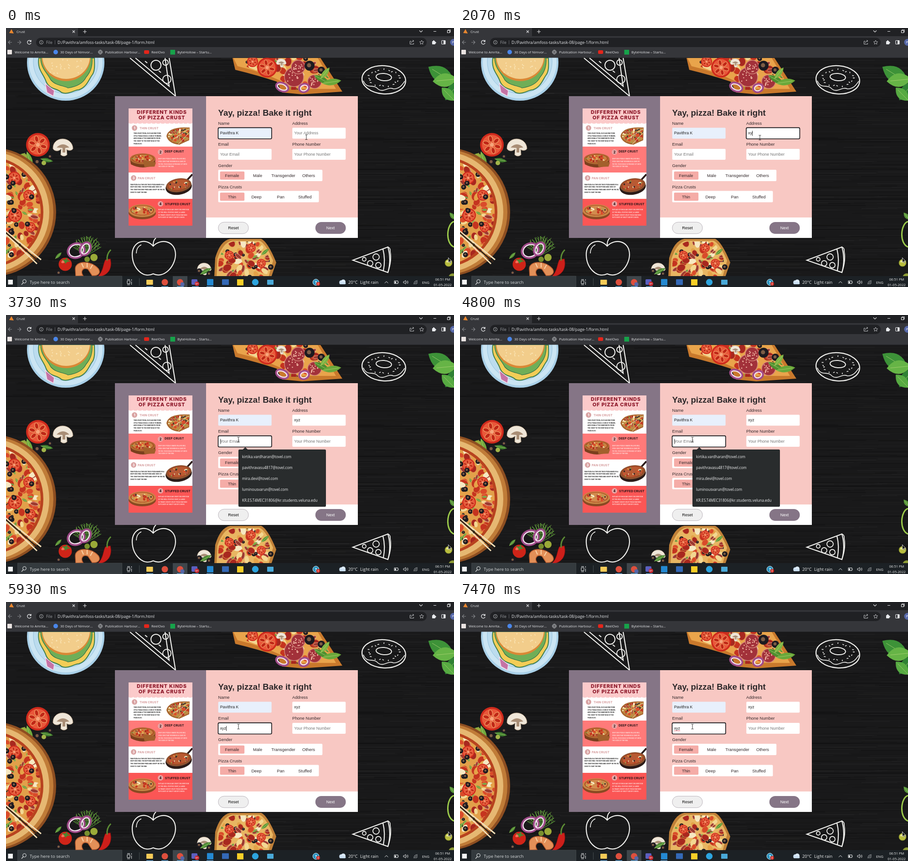
Recreate the animation shown at these times as an HTML page with a canvas. Size 983 by 570 pixels, loop 8000 ms.

```html
<!DOCTYPE html>
<html lang="en">
<head>
<meta charset="utf-8">
<title>Crust</title>
<style>
html, body { margin: 0; width: 100%; height: 100%; overflow: hidden; background: #1b1c1d; }
canvas { display: block; width: 983px; height: 570px; }
</style>
</head>
<body>
<canvas id="stage" width="983" height="570"></canvas>
<script>
const W = 983, H = 570, LOOP = 8000, TAU = Math.PI * 2;
const ARIAL = '"Liberation Sans", Arial, sans-serif';
const UI = '"Open Sans", "Noto Sans", sans-serif';
const POSTER = 'Inter, sans-serif';
const PURPLE = '#857586', PINK = '#f8c8c3';
const screen = document.getElementById('stage').getContext('2d');
const scene = document.createElement('canvas');
scene.width = W; scene.height = H;
let c = scene.getContext('2d');

let seed = 11;
const rnd = () => (seed = seed * 16807 % 2147483647) / 2147483647;
const pick = list => list[Math.floor(rnd() * list.length)];

function paint(shape, fill, stroke, w = 1) {
  if (fill) { c.fillStyle = fill; c.fill(shape); }
  if (stroke) { c.strokeStyle = stroke; c.lineWidth = w; c.stroke(shape); }
}
const path = (d, fill, stroke, w) => paint(new Path2D(d), fill, stroke, w);
function oval(x, y, rx, ry, fill, stroke, w, rot = 0) {
  const p = new Path2D();
  p.ellipse(x, y, rx, ry, rot, 0, TAU);
  paint(p, fill, stroke, w);
}
const dot = (x, y, r, fill, stroke, w) => oval(x, y, r, r, fill, stroke, w);
function box(x, y, w, h, fill, r = 0, stroke, lw) {
  const p = new Path2D();
  p.roundRect(x, y, w, h, r);
  paint(p, fill, stroke, lw);
}
function text(s, x, y, font, color, align = 'left', gap = 0) {
  c.font = font;
  c.fillStyle = color;
  c.textAlign = align;
  c.textBaseline = 'alphabetic';
  c.letterSpacing = gap + 'px';
  c.fillText(s, x, y);
  c.letterSpacing = '0px';
}
function leaf(x, y, len, wid, ang, col) {
  c.save();
  c.translate(x, y);
  c.rotate(ang);
  path(`M0 0Q${len / 2} ${-wid} ${len} 0Q${len / 2} ${wid} 0 0Z`, col);
  path(`M0 0L${len * .85} 0`, null, '#b5d67a', .7);
  c.restore();
}
function tomato(x, y, r) {
  dot(x, y, r, '#cf2a1c');
  dot(x, y, r * .84, '#e9573a');
  for (let i = 0; i < 6; i++) {
    const a = i * TAU / 6 + .3;
    oval(x + Math.cos(a) * r * .5, y + Math.sin(a) * r * .5, r * .27, r * .16, '#c02717', '#f0a066', r * .05, a);
  }
  dot(x, y, r * .17, '#f5a57a');
}
function olive(x, y, r) {
  dot(x, y, r, '#1c1a20');
  dot(x - r * .1, y - r * .1, r * .42, '#7c5c45');
}
function mushroom(x, y, k) {
  c.save();
  c.translate(x, y);
  c.scale(k, k);
  path('M-22 4C-22-24 20-24 22 4C20 10 10 9 8 6L9 18Q2 24-5 18L-4 5C-10 12-20 10-22 4Z', '#efe6d8', '#b39d84', 1);
  path('M-14 2Q0-12 14 2L5 3 5 13-1 13-1 3Z', '#a98e76');
  c.restore();
}
function onion(x, y, rx, ry, rot) {
  oval(x, y, rx, ry, null, '#a04a89', 4, rot);
  oval(x, y, rx - 3, ry - 3, null, '#f2dcec', 2.5, rot);
}
function toppings(x, y, rx, ry, n, size) {
  for (let i = 0; i < n; i++) {
    const a = rnd() * TAU, d = Math.sqrt(rnd());
    const px = x + Math.cos(a) * rx * d, py = y + Math.sin(a) * ry * d, r = size * (.5 + rnd() * .6);
    const kind = rnd();
    if (kind < .32) oval(px, py, r, r * .8, pick(['#c5341f', '#d94b2a', '#a8281f']), '#e38f4c', r * .12, a);
    else if (kind < .58) oval(px, py, r, r * .6, pick(['#f3d791', '#f6e8c2', '#e5a248']), null, 0, a);
    else if (kind < .76) leaf(px, py, r * 1.6, r * .6, a, pick(['#4f8a2e', '#6b9c3a']));
    else if (kind < .88) olive(px, py, r * .5);
    else oval(px, py, r * .9, r * .4, '#9c3a30', '#e0a08a', r * .12, a);
  }
}
function pizza(x, y, rx, ry, rot, crust, cheese) {
  c.save();
  c.translate(x, y);
  c.rotate(rot);
  oval(0, 0, rx, ry, crust);
  oval(0, -ry * .06, rx * .86, ry * .8, '#a9441f');
  oval(0, -ry * .06, rx * .8, ry * .72, cheese);
  toppings(0, -ry * .06, rx * .72, ry * .6, 26, 3.2);
  c.restore();
}
const chalk = (d, w = 2.2) => path(d, null, '#f1f1ee', w);

function wood() {
  box(0, 65, W, 482, '#19191a');
  for (let i = 0; i < 1100; i++) {
    const x = rnd() * W - 60, y = 65 + rnd() * 482;
    c.fillStyle = rnd() < .5 ? `rgba(255,255,255,${rnd() * .04})` : `rgba(0,0,0,${rnd() * .28})`;
    c.fillRect(x, y, 40 + rnd() * 190, .6 + rnd() * 1.2);
  }
  for (let y = 112; y < 546; y += 66) box(0, y, W, 1.6, 'rgba(0,0,0,.35)');
}

function burger() {
  oval(131, 76, 85, 84, '#a9d0e8');
  oval(131, 75, 81, 80, '#cbe5f3');
  oval(131, 74, 71, 70, '#bcdcee', '#94c1dd', 1);
  path('M72 66C68 92 82 100 88 118C96 136 112 132 122 142C136 148 150 136 160 136C178 130 182 112 190 102C196 92 194 78 194 66Z', '#f3cd57', '#3d7d4b', 2);
  path('M76 66C76 88 90 98 98 114C110 128 126 126 136 132C150 130 168 124 176 108C186 96 190 84 189 66Z', '#6fae57', '#2f6f4a', 1.2);
  path('M86 122L106 138 104 150 90 142Z', '#c573a5', '#f2dbe9', 1.5);
  path('M78 66C80 96 104 117 132 117C160 117 184 96 186 66Z', '#d98836');
  path('M80 66C82 93 106 112 132 112C160 112 182 92 184 66Z', '#f2cd8b');
  for (let i = 0; i < 26; i++) oval(96 + rnd() * 70, 68 + rnd() * 32, 1.6, .9, '#fbe6b8', null, 0, rnd() * 3);
}

function chalkTop() {
  chalk('M272 66L372 150L358 66M284 66L358 128L349 66');
  for (const [x, y, r] of [[329, 82, 11], [353, 113, 9], [350, 76, 6]]) dot(x, y, r, null, '#f1f1ee', 2);
  chalk('M305 73l5 4M340 98l-5-4');
  oval(829, 114, 48, 31, null, '#f1f1ee', 2.2, .08);
  oval(829, 108, 17, 8, null, '#f1f1ee', 2, .08);
  chalk('M784 116C792 136 806 122 816 134C828 144 838 128 850 134C864 134 870 124 875 117', 1.6);
  for (let i = 0; i < 20; i++) {
    const a = i * TAU / 20, x = 829 + Math.cos(a) * 33, y = 110 + Math.sin(a) * 18;
    chalk(`M${x} ${y}l${Math.cos(i * 2) * 4} ${Math.sin(i * 2) * 3}`, 1.6);
  }
}

function topSlice() {
  path('M497 66L503 92Q552 104 594 118L606 142 650 146 738 140 690 66Z', '#c9792c');
  path('M499 66L508 84Q560 96 602 116L630 134 724 134 684 66Z', '#e9a44b');
  c.save();
  c.clip(new Path2D('M518 66L524 84 600 112 626 136 722 134 682 66Z'));
  toppings(612, 96, 104, 42, 64, 11);
  c.restore();
  tomato(573, 87, 22);
  tomato(541, 74, 12);
  for (const [x, y, r] of [[632, 108, 21], [641, 86, 15], [677, 118, 15]]) {
    dot(x, y, r, '#a2313a', '#d38478', 1.5);
    for (let i = 0; i < 18; i++) dot(x + (rnd() - .5) * r * 1.4, y + (rnd() - .5) * r * 1.4, 1.3, '#efb3a0');
  }
  onion(606, 130, 14, 9, .4);
  onion(654, 132, 11, 9, -.3);
  olive(666, 83, 11);
  olive(692, 93, 8);
  mushroom(604, 76, .5);
  leaf(676, 104, 40, 13, .5, '#4f8f2f');
  leaf(694, 122, 42, 14, -.15, '#6aa83a');
  leaf(690, 112, 32, 11, -.9, '#7fb444');
}

function sides() {
  leaf(983, 120, 66, 34, Math.PI + .55, '#3d9238');
  leaf(990, 112, 54, 30, Math.PI - .1, '#66b446');
  leaf(996, 118, 52, 25, Math.PI - .9, '#2f8134');
  leaf(984, 160, 40, 22, Math.PI + .8, '#57aa42');
  leaf(986, 422, 20, 9, Math.PI + .9, '#57953a');
  path('M983 426C967 430 963 474 983 482', null, '#9dcc4b', 3);
  dot(971, 517, 8, '#b9bd3f', '#6d7824', 1);
  dot(968, 514, 2, '#e7e69a');
  dot(980, 549, 9, '#8d9b35');

  leaf(42, 275, 30, 9, 2.5, '#5b9433');
  leaf(46, 272, 40, 13, 1.3, '#72a93d');
  leaf(76, 288, 28, 9, .2, '#3f7d2d');
  tomato(70, 257, 26);
  mushroom(125, 261, 1);
  olive(69, 295, 8);
  olive(97, 283, 6);
  dot(39, 283, 7, '#9aab3d');
  dot(83, 297, 5, '#a2b449');
}

function bigPizza() {
  dot(-32, 405, 142, '#8d4e21');
  dot(-34, 405, 138, '#c07c38');
  dot(-38, 405, 133, '#e6b872');
  dot(-40, 405, 122, '#b8431f');
  dot(-40, 405, 116, '#e2a04a');
  c.save();
  c.beginPath();
  c.arc(-40, 405, 116, 0, TAU);
  c.clip();
  toppings(32, 400, 46, 120, 140, 10);
  for (const [x, y, r] of [[18, 330, 14], [50, 368, 12], [20, 412, 15], [54, 438, 11]]) tomato(x, y, r);
  for (let i = 0; i < 12; i++) olive(rnd() * 70, 310 + rnd() * 190, 5.5);
  c.restore();
  path('M-2 446L77 510M-2 452L68 519', null, '#f2ddb6', 3);
  path('M-2 449L73 515', null, '#382618', 3);
}

function bottomFood() {
  for (let i = 0; i < 13; i++) {
    const a = -2.9 + i * .22, x = 178 + Math.cos(a) * 32, y = 490 + Math.sin(a) * 32;
    path(`M178 500Q${(178 + x) / 2} ${y + 10} ${x} ${y}`, null, '#4f8f34', 1.2);
    for (let k = 0; k < 6; k++) path(`M${178 + (x - 178) * (.4 + k * .1)} ${496 + (y - 496) * (.4 + k * .1)}l${rnd() * 12 - 6} ${-rnd() * 8}`, null, '#76b343', .9);
  }
  onion(154, 490, 19, 16, -.4);
  onion(174, 486, 11, 15, .5);
  dot(130, 520, 14.5, '#cf2418');
  oval(126, 514, 5, 3, '#f4735a', null, 0, -.5);
  path('M122 508l7 2 5-5 1 6 7 2-8 2-4 4-2-5Z', '#4d8530');
  path('M152 530C152 512 186 510 203 530C209 540 201 546 189 545L180 531C168 526 163 536 169 545L153 546Z', '#e39058', '#b85a2c', 1.5);
  path('M166 518l4 9M178 517l0 10M190 521l-5 9', null, '#fbd2a6', 2);
  path('M229 508C234 530 224 546 200 548C214 536 212 522 218 510Z', '#cd1f1a', '#7d100f', 1);
  path('M222 512Q220 498 230 488', null, '#5c8c34', 3);
  dot(193, 505, 8, '#9aaa38');
  dot(178, 509, 6, '#78902e');
  olive(116, 539, 6);
  leaf(108, 508, 20, 7, -.8, '#548f34');

  chalk('M323 480C306 460 276 470 277 500C278 528 300 552 323 541C346 552 371 526 372 499C372 468 340 462 323 480ZM323 480Q322 468 329 462');
  chalk('M286 496Q286 482 297 477', 1.6);
  chalk('M761 511L838 482Q846 510 838 538ZM827 486Q833 510 828 534');
  chalk('M838 482q6 2 5 10q4 20-5 46', 1.8);
  for (const [x, y, r] of [[812, 504, 7], [799, 518, 6], [817, 522, 6], [786, 509, 4]]) dot(x, y, r, null, '#f1f1ee', 1.8);

  mushroom(435, 529, .7);
  leaf(426, 542, 28, 9, -.5, '#4c8a35');
  olive(424, 535, 6);
  olive(446, 541, 6);
  path('M457 548L459 506Q470 468 492 464L560 464Q574 470 593 516L582 548Z', '#c08038');
  path('M462 548L464 508Q476 472 496 468L556 468Q570 474 586 512L576 548Z', '#e8b662');
  c.save();
  c.clip(new Path2D('M464 548L467 508Q480 474 498 470L554 470Q566 478 580 512L572 548Z'));
  toppings(525, 512, 60, 46, 95, 9);
  for (const [x, y] of [[490, 500], [538, 484], [560, 518]]) tomato(x, y, 10);
  c.restore();
  leaf(560, 500, 22, 7, -.7, '#5f9a38');
  olive(581, 526, 6);
}

function poster() {
  box(269, 177, 140, 258, '#fff');
  box(269, 177, 140, 31, '#fbcaca');
  for (let x = 274; x < 409; x += 10) oval(x, 208, 5, 2.6, '#fbcaca');
  box(269, 261, 140, 57, '#ff7a79');
  box(269, 376, 140, 59, '#fb5655');
  const title = '800 11px ' + POSTER;
  text('DIFFERENT KINDS', 342, 188.5, title, '#8b1527', 'center', .8);
  text('OF PIZZA CRUST', 342, 201, title, '#8b1527', 'center', .8);

  const badge = (n, x, y, fill, ink, label, lx, ly, col) => {
    dot(x, y, 6, fill);
    text(n, x, y + 2.5, '800 7px ' + POSTER, ink, 'center');
    text(label, lx, ly, '700 6.6px ' + POSTER, col, 'left', .12);
  };
  badge('1', 282, 220, '#d9a3a3', '#fff', 'THIN CRUST', 293, 222.5, '#d59a9b');
  badge('2', 339, 273, '#e9a5a5', '#2a1518', 'DEEP CRUST', 348, 273.6, '#201316');
  badge('3', 280, 330, '#d9a3a3', '#fff', 'PAN CRUST', 289, 332.5, '#d59a9b');
  badge('4', 339, 387, '#e9a5a5', '#2a1518', 'STUFFED CRUST', 349, 389.6, '#201316');

  const notes = (x, y, step, col, lines) =>
    lines.forEach((s, i) => text(s, x, y + i * step, '700 3.1px ' + UI, col));
  notes(280, 233, 5.7, '#151515', ['THIN CRUST PIZZA, SUCH AS NEW YORK', 'STYLE PIZZA DOUGH, IS MUCH THINNER,', 'AND USUALLY THE SAME WIDTH FROM', 'THE CRUST TO THE VERY EDGE OF THE', 'PIZZA SLICE.']);
  notes(334, 289, 5.8, '#ffe3df', ['DEEP DISH PIZZA IS BAKED IN A ROUND,', 'STEEL PAN THAT RESEMBLES A CAKE OR', 'PIE TIN. THE DOUGH IS PRESSED UP ONTO', 'THE SIDES OF THE PAN.']);
  notes(273, 345.5, 5.7, '#151515', ['PAN PIZZA IS A THIN OR THICK PIZZA BAKED IN A', 'DEEP DISH PAN. THE BOTTOMS AND SIDES OF', 'THE CRUST BECOME FRIED AND CRISPY IN THE OIL', 'USED TO COAT THE PAN']);
  notes(334, 401, 5.8, '#ffe3df', ['IN PLACE OF REGULAR CRUST ON EVERY RIM', 'OF THE WELL STUFFED CRUST, A LARGE', 'ULTIMATE CHEESY CRUST PIZZA FEATURES', 'IN POCKETS OF MELTY GOOEY CHEESE.']);

  c.save();
  c.beginPath();
  c.rect(269, 177, 140, 258);
  c.clip();
  path('M352 238Q356 216 403 219L402 247 380 257Q356 254 352 238Z', '#a8662f');
  path('M355 237Q360 219 402 221L401 245 379 254Q358 250 355 237Z', '#c08a43');
  c.save();
  c.clip(new Path2D('M355 237Q360 219 402 221L401 245 379 254Q358 250 355 237Z'));
  toppings(379, 236, 25, 17, 75, 4);
  c.restore();
  path('M377 257L403 229M365 246L402 222', null, '#efe0c0', 1);

  path('M272 288L274 300Q300 314 327 300L328 288Z', '#7c3f1d');
  pizza(300, 288, 28, 12, 0, '#b06a33', '#c98240');
  path('M300 290L329 296 326 305 304 306Z', '#a3602c');
  oval(379, 350, 29, 17, '#2c1c19', null, 0, -.15);
  path('M398 334L409 322', null, '#2c1c19', 4);
  pizza(379, 346, 28, 15, -.15, '#8f5230', '#b85a32');
  oval(299, 407, 30, 14, '#8a4a22');
  pizza(299, 402, 30, 14, 0, '#c98545', '#d28b4d');
  c.restore();
}

function formBase() {
  box(239, 150, 200, 312, PURPLE);
  box(439, 150, 333, 267, PINK);
  box(439, 417, 333, 45, '#fff');
  poster();
  text('Yay, pizza! Bake it right', 465.5, 193.4, 'bold 18.6px ' + ARIAL, '#2c2729');
  const label = (s, x, y, align) => text(s, x, y, '9.3px ' + ARIAL, '#33292b', align);
  label('Name', 465.5, 212.7);
  label('Address', 628, 212.7);
  label('Email', 465.5, 259.4);
  label('Phone Number', 628, 259.4);
  label('Gender', 465.5, 306);
  label('Pizza Crusts', 465.5, 352.5);
  box(465.7, 312, 228.6, 25, '#fff', 2);
  box(465.7, 358.6, 220.8, 25, '#fff', 2);
  for (const y of [315.7, 362.3]) box(469.6, y, 53.6, 18, '#f5aca7', 2);
  [['Female', 496], ['Male', 552], ['Transgender', 608.5], ['Others', 664]].forEach(([s, x]) => label(s, x, 328.3, 'center'));
  [['Thin', 496], ['Deep', 549.5], ['Pan', 602.7], ['Stuffed', 656]].forEach(([s, x]) => label(s, x, 374.8, 'center'));
  box(465.8, 427.3, 66.3, 25.4, '#efefef', 12.7, '#aaa3ab', .8);
  text('Reset', 499, 443.2, '9px ' + ARIAL, '#111', 'center');
  box(678.8, 427, 66.8, 26, PURPLE, 13);
  text('Next', 712, 443.2, '9px ' + ARIAL, '#fff', 'center');
}

function browser() {
  const line = (d, w = 1.1, col = '#e3e4e6') => path(d, null, col, w);
  box(0, 0, W, 20, '#202124');
  box(-6, -6, 164, 28, '#35363a', 6);
  box(0, 18, W, 47.5, '#35363a');
  box(66, 21.5, 857, 20.5, '#202124', 10);
  path('M12 2.5L17 12 7 11Z', '#e9872f');
  text('Crust', 23, 10.7, '7.5px ' + UI, '#e6e7e9');
  line('M146 5.5l5 5m0-5l-5 5M173 4v8m-4-4h8M907 5.5l3.5 3.5 3.5-3.5M938 7.5h6M968.5 5.5h5v5h-5zM970 5.5v-1.5h5v5h-1.5');
  line('M13 31.5H5m4-4l-4 4 4 4M25 31.5h8m-4-4l4 4-4 4', 1.1, '#85878b');
  line('M54.5 29A4.2 4.2 0 1 0 55 33M55 26.5v3.2h-3.2', 1.4);
  dot(77.5, 31.5, 4, null, '#b8babd', 1);
  line('M77.5 31v2.5M77.5 29v1', 1, '#b8babd');
  text('File', 88, 34.7, '8.8px ' + UI, '#9a9da1');
  line('M107.5 27v9', .8, '#6b6d71');
  text('D:/Pavithra/amfoss-tasks/task-08/page-1/form.html', 113, 34.7, '8.9px ' + UI, '#e8eaed');
  line('M889 29h-2.5v6.5h8v-2.5M889.5 33q0-4.5 5-4.5m-2-2l2.5 2-2.5 2', 1, '#c4c6c9');
  line('M912 27l1.3 3 3.3.3-2.5 2.2.8 3.2-2.9-1.7-2.9 1.7.8-3.2-2.5-2.2 3.3-.3Z', .9, '#c4c6c9');
  box(935, 29, 7, 7, '#e8eaed', 1);
  dot(938.5, 28.7, 1.6, '#e8eaed');
  dot(942.3, 32.3, 1.6, '#e8eaed');
  box(956, 27.5, 8, 8, null, 1, '#e8eaed', 1.2);
  box(960, 27.5, 4, 8, '#e8eaed');
  dot(982, 31.5, 7.5, '#5567a8');
  text('P', 981, 34.3, '7.5px ' + UI, '#fff', 'center');

  box(3, 48, 10, 10, '#e9e3e1', 1);
  dot(109, 53, 5, '#4a86e8');
  dot(207, 53, 4.3, null, '#c3c5c8', 1);
  line('M203 53h8M207 49q-4 4 0 8q4-4 0-8', .8, '#c3c5c8');
  box(303, 49, 11, 8, '#e4251b', 2);
  box(360.5, 48, 10.5, 10.5, '#17a34a');
  [['Welcome to Amrita...', 19], ['30 Days of Nimvor...', 119], ['Publication Harbour...', 217.5], ['ReelOvo', 319], ['ByteHollow – Startu...', 376]]
    .forEach(([s, x]) => text(s, x, 55.8, '7.6px ' + UI, '#e3e4e7'));
}

function taskbar() {
  const line = (d, w = 1, col = '#eceeef') => path(d, null, col, w);
  box(0, 546, W, 24, '#1c2125');
  box(25.5, 546, 229, 24, '#343a3e', 0, '#4c5256', .6);
  box(4.5, 554, 10.5, 10.5, '#f4f5f5');
  dot(40.5, 557.5, 3.7, null, '#eceeef', 1.1);
  line('M38 560.5l-4 4.3', 1.2);
  text('Type here to search', 52, 562.7, '9.6px ' + UI, '#d4d7d9');
  line('M266 556h6v6.5h-6zM266 553.5h6M266 565h6M275.5 553v3m0 2v7');
  line('M292.5 551v16', .7, '#5b6064');
  box(366, 546, 32, 24, '#3f464b');
  box(308, 554, 14.5, 11, '#f5cb58', 1);
  dot(348.5, 559.5, 7, '#dd4f3d');
  dot(382, 559.5, 7, '#dd4f3d');
  dot(387, 564, 4.5, '#5567a8');
  box(407, 553, 13, 12, '#5b5fc0', 2);
  dot(419, 563, 5, '#c62a32');
  text('9+', 419, 565.3, '6px ' + UI, '#fff', 'center');
  box(441, 552.5, 14, 14, '#2489d2', 1);
  box(474, 553, 15, 12.5, '#3469b7', 1);
  box(507, 553, 14, 13.5, '#f7cf28');
  dot(547, 559.5, 7.2, '#2da4de');
  box(573, 554, 14, 11, '#4aa9d8', 1);
  for (const x of [308, 341, 375, 408, 440]) box(x, 568.7, 15, 1.3, '#76b9ed');
  dot(680, 559.5, 6.8, '#2790bd', '#dceef5', 1);
  text('?', 680, 563, 'bold 9.5px ' + UI, '#fff', 'center');
  dot(685, 563, 4, '#d62d25');
  text('!', 685, 565.5, 'bold 6.5px ' + UI, '#fff', 'center');
  dot(735.5, 559.5, 4.3, '#c9def1');
  dot(740, 558.5, 5, '#dbeafa');
  box(731.5, 559.5, 14, 4.5, '#c9def1', 2.2);
  text('20°C', 751, 563, '9.4px ' + UI, '#f1f2f2');
  text('Light rain', 777, 563, '9.2px ' + UI, '#f1f2f2');
  line('M831 561.5l3.7-3.7 3.7 3.7');
  line('M852 556.5h8v6h-8zM861 558.5v2');
  box(853, 558, 3, 3.5, '#eceeef');
  line('M872 558h2l3-2.5v8l-3-2.5h-2zM879 557.5q1.5 2 0 4M881 556q2.6 3.5 0 7', .9);
  line('M895 564q0-8 8-8M897.5 564q0-5.5 5.5-5.5M900 564q0-3 3-3', 1, '#b9bdbf');
  text('ENG', 913, 562.5, '7.8px ' + UI, '#f1f2f2');
  text('06:51 PM', 958, 556, '7.5px ' + UI, '#f1f2f2', 'center');
  text('01-05-2022', 958, 568, '7.6px ' + UI, '#f1f2f2', 'center');
}

function buildScene() {
  wood();
  burger();
  chalkTop();
  topSlice();
  sides();
  bigPizza();
  bottomFood();
  formBase();
  browser();
  taskbar();
  path('M970.5 505.5v10.5l2.4-2.2 1.8 3.9 1.7-.8-1.8-3.7h3.3Z', '#111', '#e8e8e8', .9);
}

const fields = {
  name: { x: 465.7, y: 219.5, hint: 'Your Name' },
  addr: { x: 628.3, y: 219.5, hint: 'Your Address' },
  email: { x: 465.7, y: 266, hint: 'Your Email' },
  phone: { x: 628.3, y: 266, hint: 'Your Phone Number' }
};
const mails = ['kirtika.vardharan@tovel.com', 'pavithravasu4817@tovel.com', 'mira.devi@tovel.com', 'luminousvarun@tovel.com', 'KR.ES.T4MEC31806@kr.students.veluna.edu'];
const steps = [
  { t: 0, focus: 'name', name: 'Pavithra K', addr: '', email: '', phone: '', caret: 0, menu: 0, spell: 0, mouse: [659, 240] },
  { t: 530, focus: 'addr', caret: 1, mouse: [658, 241] },
  { t: 1000, caret: 0 },
  { t: 1530, caret: 1 },
  { t: 2070, addr: 'xy' },
  { t: 2670, addr: 'xyz', mouse: [484, 222] },
  { t: 3200, caret: 0, mouse: [510, 272] },
  { t: 3730, focus: 'email', caret: 1, menu: 1, mouse: [510, 274] },
  { t: 4270, caret: 0 },
  { t: 4800, caret: 1 },
  { t: 5330, email: 'x', menu: .53 },
  { t: 5930, email: 'xyz', menu: 0 },
  { t: 6400, caret: 0 },
  { t: 6930, caret: 1, spell: 1 },
  { t: 7470, caret: 0 }
];

function drawField(id, s) {
  const { x, y, hint } = fields[id], value = s[id], font = '8.85px ' + ARIAL;
  const focused = s.focus === id;
  box(x, y, 117, 24, id === 'name' ? '#e8f0fc' : '#fff', 2);
  if (focused) box(x - .2, y - .1, 117.4, 24.6, null, 2.5, '#101114', 1.6);
  text(value || hint, x + 4, y + 14.6, font, value ? '#222' : '#777');
  const end = x + 4 + (value ? c.measureText(value).width : .8);
  if (focused && s.caret) box(end, y + 6.8, .9, 11, '#111');
  if (id === 'email' && s.spell) {
    let d = `M${x + 4} ${y + 17}`;
    for (let i = 0; i < 7; i++) d += `l1.9 ${i % 2 ? -.8 : .8}`;
    path(d, null, '#e2414d', .9);
  }
}

// The menu fades as one layer and shrinks slightly while leaving.
const layer = document.createElement('canvas');
layer.width = W; layer.height = H;
function drawMenu(alpha) {
  if (!alpha) return;
  c = layer.getContext('2d');
  c.clearRect(0, 0, W, H);
  c.save();
  if (alpha < 1) {
    c.translate(606, 359);
    c.scale(.98, .98);
    c.translate(-606, -359);
  }
  box(510, 296, 192, 126, '#292c2d', 2.5);
  path('M519 296.5L525 291 531 296.5Z', '#292c2d');
  mails.forEach((m, i) => text(m, 518, 314.5 + i * 24, '8.1px ' + UI, '#f2f3f4'));
  c.restore();
  c = screen;
  c.globalAlpha = alpha;
  c.drawImage(layer, 0, 0);
  c.globalAlpha = 1;
}

function drawBeam([x, y]) {
  path(`M${x - 2.5} ${y - 5}h2l.5.6.5-.6h2M${x} ${y - 4.5}v9.5M${x - 2.5} ${y + 5.5}h2l.5-.6.5.6h2`, null, '#1b1b1b', .9);
}

function draw(time) {
  const s = Object.assign({}, ...steps.filter(k => k.t <= time));
  c = screen;
  c.drawImage(scene, 0, 0);
  Object.keys(fields).forEach(id => drawField(id, s));
  drawMenu(s.menu);
  drawBeam(s.mouse);
}

buildScene();
const start = performance.now();
function tick() {
  draw((performance.now() - start) % LOOP);
  requestAnimationFrame(tick);
}
tick();
</script>
</body>
</html>
```
